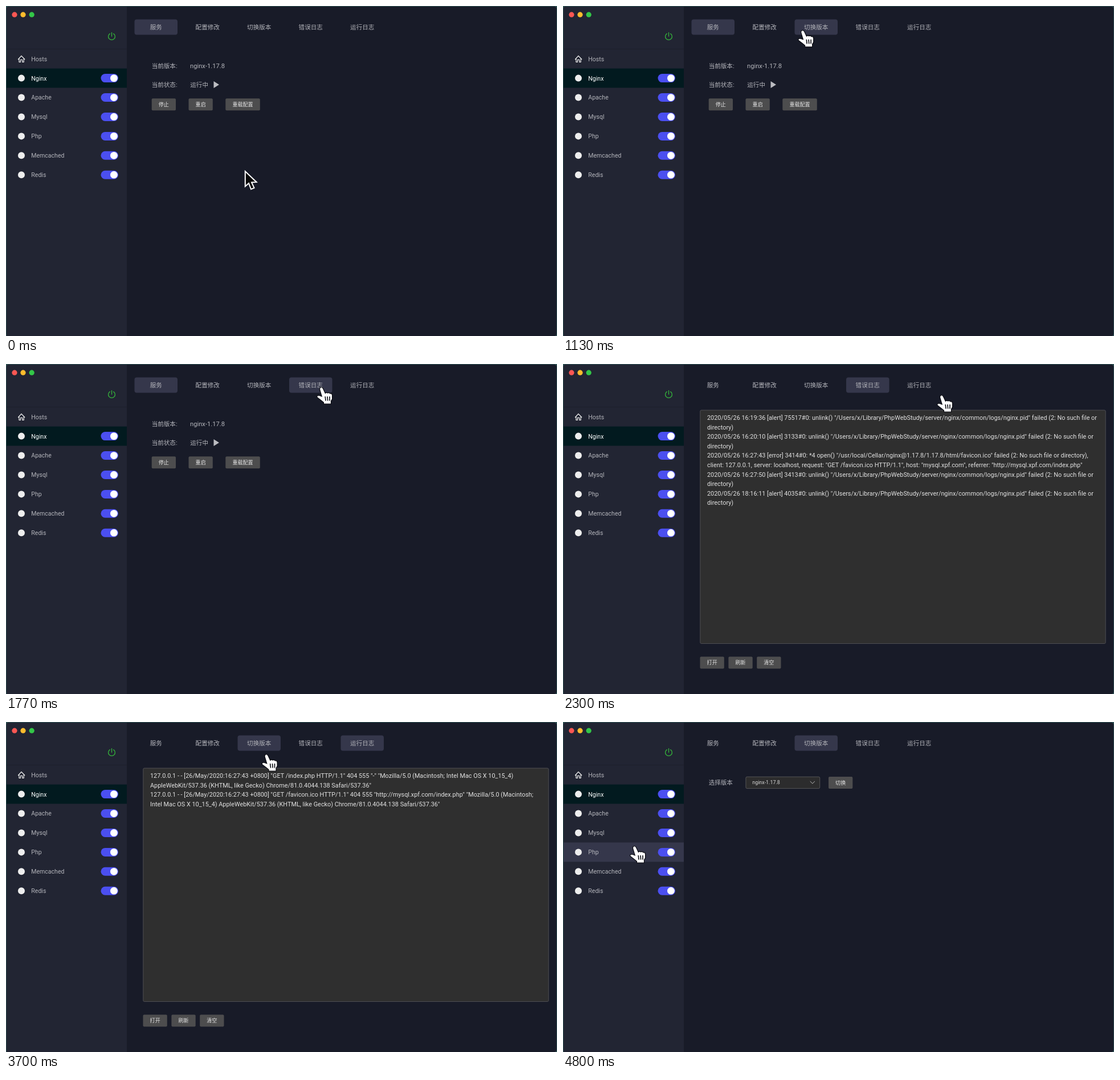
An HTML page for the animation above (4830 ms loop, 967 by 579 pixels).

```html
<!DOCTYPE html>
<html lang="zh-CN">
<head>
<meta charset="utf-8">
<title>Nginx</title>
<style>
  html, body { margin: 0; width: 100%; height: 100%; overflow: hidden; background: #181b28; }
  svg { display: block; width: 967px; height: 579px; }
  text { font: 10.56px Roboto, "Noto Sans CJK SC", sans-serif; fill: #b4b5bb; white-space: pre; }
  .mid { text-anchor: middle; }
  .label { font-size: 9.05px; font-weight: 500; fill: #e6e6e6; }
  .log { font-size: 10.86px; fill: #e2e2e2; }
  .target { fill: #35374b; visibility: hidden; }
  .on { visibility: visible; }
</style>
</head>
<body>
<svg id="stage" viewBox="0 0 967 579"></svg>
<script>
const LOOP = 4830;

const errorLog = [
  '2020/05/26 16:19:36 [alert] 75517#0: unlink() "/Users/x/Library/PhpWebStudy/server/nginx/common/logs/nginx.pid" failed (2: No such file or',
  'directory)',
  '2020/05/26 16:20:10 [alert] 3133#0: unlink() "/Users/x/Library/PhpWebStudy/server/nginx/common/logs/nginx.pid" failed (2: No such file or',
  'directory)',
  '2020/05/26 16:27:43 [error] 3414#0: *4 open() "/usr/local/Cellar/nginx@1.17.8/1.17.8/html/favicon.ico" failed (2: No such file or directory),',
  'client: 127.0.0.1, server: localhost, request: "GET /favicon.ico HTTP/1.1", host: "mysql.xpf.com", referrer: "http://mysql.xpf.com/index.php"',
  '2020/05/26 16:27:50 [alert] 3413#0: unlink() "/Users/x/Library/PhpWebStudy/server/nginx/common/logs/nginx.pid" failed (2: No such file or',
  'directory)',
  '2020/05/26 18:16:11 [alert] 4035#0: unlink() "/Users/x/Library/PhpWebStudy/server/nginx/common/logs/nginx.pid" failed (2: No such file or',
  'directory)'
];
const accessLog = [
  '127.0.0.1 - - [26/May/2020:16:27:43 +0800] "GET /index.php HTTP/1.1" 404 555 "-" "Mozilla/5.0 (Macintosh; Intel Mac OS X 10_15_4)',
  'AppleWebKit/537.36 (KHTML, like Gecko) Chrome/81.0.4044.138 Safari/537.36"',
  '127.0.0.1 - - [26/May/2020:16:27:43 +0800] "GET /favicon.ico HTTP/1.1" 404 555 "http://mysql.xpf.com/index.php" "Mozilla/5.0 (Macintosh;',
  'Intel Mac OS X 10_15_4) AppleWebKit/537.36 (KHTML, like Gecko) Chrome/81.0.4044.138 Safari/537.36"'
];

const rect = (x, y, w, h, fill, r = 0, extra = '') =>
  `<rect x="${x}" y="${y}" width="${w}" height="${h}" rx="${r}" fill="${fill}" ${extra}/>`;
const circle = (x, y, r, fill) => `<circle cx="${x}" cy="${y}" r="${r}" fill="${fill}"/>`;
const text = (x, y, s, attrs = '') => `<text x="${x}" y="${y}" ${attrs}>${s}</text>`;
const line = (d, color, width) =>
  `<path d="${d}" fill="none" stroke="${color}" stroke-width="${width}" stroke-linejoin="round" stroke-linecap="round"/>`;
const button = (x, y, w, s) =>
  rect(x, y, w, 21, '#4d4d4e', 2) + text(x + w / 2, y + 13.8, s, 'class="mid label"');
const page = (id, content) => `<g id="${id}">${content}</g>`;

const tabs = ['服务', '配置修改', '切换版本', '错误日志', '运行日志'].map((name, i) =>
  rect(225.5 + 90.5 * i, 23.5, 75.5, 27, '', 4, 'class="target"') +
  text(263.2 + 90.5 * i, 41, name, 'class="mid"')).join('');

const rows = ['Hosts', 'Nginx', 'Apache', 'Mysql', 'Php', 'Memcached', 'Redis'].map((name, i) => {
  const y = 92.7 + 33.92 * i;
  const icon = i
    ? circle(27, y, 6, '#eeeeee') + rect(166.5, y - 7.5, 30.5, 15, '#4b4ff0', 7.5) + circle(189.4, y, 6.4, '#fff')
    : line('M21.5 93.5L27 87.5L32.8 93.5M23 92.5V98.3H25.5V94.3H28.7V98.3H31.2V92.5', '#eeeeee', 1.2);
  return rect(1, y - 17, 211, 33.9, '', 0, 'class="target"') +
    (i === 1 ? rect(1, y - 17, 211, 33.9, '#021a1f') : '') +
    icon + text(44.3, y + 3.9, name, i === 1 ? 'style="fill:#fff"' : '');
}).join('');

const logPage = lines =>
  rect(240.8, 81, 711.4, 409.5, '#2f2f2f', 2, 'stroke="#58595d" stroke-width=".8"') +
  lines.map((s, i) => text(253, 98 + 16.6 * i, s, 'class="log"')).join('') +
  button(240.5, 513.5, 42.3, '打开') + button(290.4, 513.5, 42.3, '刷新') + button(340.2, 513.5, 42.3, '清空');

const service =
  text(255.7, 109, '当前版本:') + text(323, 108.6, 'nginx-1.17.8', 'style="font-size:11.2px"') +
  text(255.7, 142.2, '当前状态:') + text(323.3, 142.2, '运行中') +
  '<path d="M364.5 132V144L374 138Z" fill="#bcbdc2"/>' +
  button(255.7, 162.3, 42.3, '停止') + button(320.5, 162.3, 42.3, '重启') + button(385.3, 162.3, 60.5, '重载配置');

const version =
  text(255.7, 110.3, '选择版本') +
  rect(320.9, 96.2, 129.8, 20.4, '#2c2c2d', 2, 'stroke="#626263" stroke-width=".8"') +
  text(332.3, 109.3, 'nginx-1.17.8', 'style="font-size:8.9px;fill:#d8d8d8"') +
  line('M434 104.3L437.8 108L441.6 104.3', '#b8b8b8', 1) + button(466, 96, 42.3, '切换');

const arrow = `<path d="M.8 1V27.5L7 22L11 32.5L16.5 30.2L12 20.5L20.6 20Z"
  fill="#080808" stroke="#fff" stroke-width="2" stroke-linejoin="miter"/>`;
const hand = `<path d="M6.2 0Q9 -1 10.4 2L14.3 10.3Q16.5 8.2 18.6 10Q21 8.5 22.6 10.8Q26.2 10.2 26.6 14V20.5L24.5 24V29H11.5V26.5L6.5 22.5L0 17.5Q-1 14 3 14L8.2 15.8L4.6 4Q4 1 6.2 0Z"
  fill="#fff" stroke="#08090f" stroke-width="1.2"/>` + line('M14.2 16.5L15 23M18 16.5L18.6 23M22 16.5V23', '#08090f', 1.6);

const stage = document.getElementById('stage');
stage.innerHTML =
  rect(0, 0, 967, 579, '#2f5355') + rect(.8, 1, 965.4, 578, '#181b28', 4) +
  '<path d="M1 5Q1 1 5 1H212V579H1Z" fill="#222533"/>' +
  circle(15, 15.2, 4.6, '#fc5753') + circle(30, 15.2, 4.6, '#fdbc2d') + circle(45.2, 15.2, 4.6, '#33c748') +
  line('M182.3 48.6A5.9 5.9 0 1 0 188.7 48.6M185.5 46.6V53.2', '#35b53b', 1.3) +
  rect(1, 75, 211, .8, '#1c1f2b') + tabs + rows +
  page('service', service) + page('version', version) +
  page('errors', logPage(errorLog)) + page('access', logPage(accessLog)) +
  `<g id="cursor"><g id="arrow">${arrow}</g><g id="hand">${hand}</g></g>`;

const targets = [...stage.querySelectorAll('.target')];
const byId = id => document.getElementById(id);
const show = (id, visible) => byId(id).style.display = visible ? '' : 'none';

// start time, page, tab
const pages = [[0, 'service', 0], [1830, 'errors', 3], [2830, 'access', 4], [3730, 'version', 2]];
// from, to, hovered target: tabs 0-4, then sidebar rows; -1 keeps the hand only
const hovers = [
  [430, 580, 2], [720, 980, 1], [1090, 1400, 2], [1470, 2000, 3], [2040, 2270, 4], [2270, 2500, -1],
  [2500, 3180, 4], [3230, 3450, 3], [3480, 3800, 2], [4380, 4600, 10], [4600, LOOP, 9]
];
// time, x, y
const path = [
  [0, 419, 289], [90, 422, 294], [480, 457, 52], [670, 395, 45], [800, 366, 43], [900, 366, 43],
  [1070, 402, 43], [1300, 462, 42], [1600, 546, 41], [1900, 546, 41], [2130, 628, 47], [2300, 657, 55],
  [2450, 658, 52], [2700, 640, 45], [3000, 638, 45], [3300, 562, 50], [3600, 454, 57], [3700, 449.5, 57],
  [4100, 449.5, 57], [4270, 300, 234], [4450, 186, 249], [4650, 135, 243], [4800, 118, 218], [LOOP, 118, 218]
];

function cursorAt(t) {
  const i = path.findIndex(p => p[0] > t);
  const [t0, x0, y0] = path[i - 1], [t1, x1, y1] = path[i];
  const u = (t - t0) / (t1 - t0), k = u * u * (3 - 2 * u);
  return [x0 + (x1 - x0) * k, y0 + (y1 - y0) * k];
}

function draw(now) {
  const t = Math.floor((now % LOOP + 4) * .03) / .03 % LOOP;
  const [, current, tab] = pages.findLast(p => p[0] <= t + 4);
  const hover = hovers.find(h => t >= h[0] && t < h[1]);
  for (const [, id] of pages) show(id, id === current);
  targets.forEach((el, i) => el.classList.toggle('on', i === tab || !!hover && i === hover[2]));
  show('hand', hover);
  show('arrow', !hover);
  byId('cursor').setAttribute('transform', `translate(${cursorAt(t)})`);
  requestAnimationFrame(draw);
}
draw(performance.now());
</script>
</body>
</html>
```
